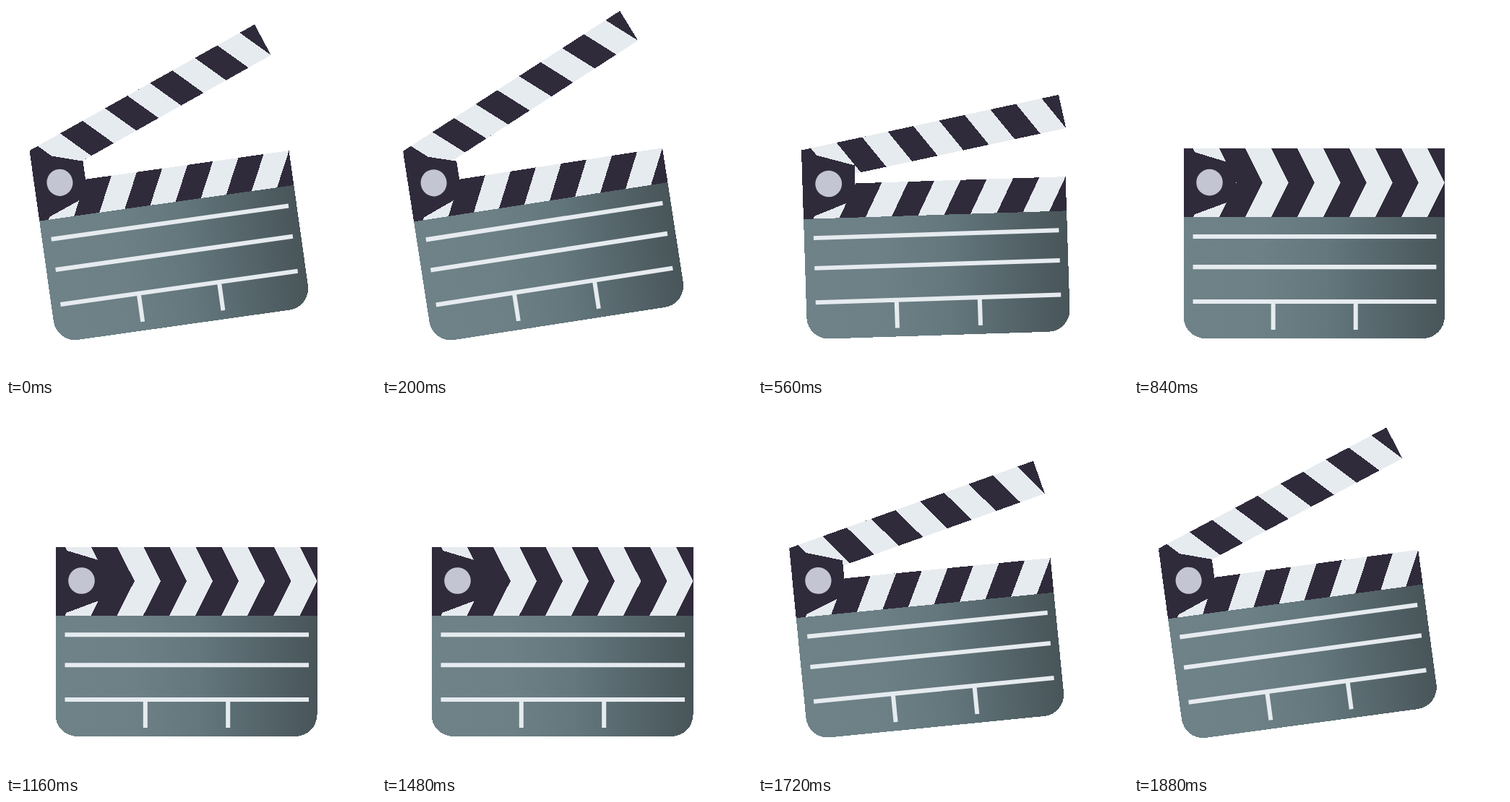
An HTML page that plays this animation: 512x512 px, repeating every 1.92 s.

```html
<!DOCTYPE html>
<html lang="en">
<head>
<meta charset="utf-8">
<title>Clapperboard</title>
<style>
  html, body { margin: 0; width: 100%; height: 100%; overflow: hidden; background: #fff; }
  svg { display: block; width: 100%; height: 100%; }
  .dark { fill: #302b3b; }
  .light { fill: #e6ebef; }
  .crisp { shape-rendering: crispEdges; }
  #board { transform-origin: 113px 458px; }
  #arm { transform-origin: 64px 196.5px; }
</style>
</head>
<body>
<svg viewBox="0 0 512 512">
  <defs>
    <linearGradient id="slate">
      <stop offset="0" stop-color="#6e8288"/>
      <stop offset=".3" stop-color="#6c8086"/>
      <stop offset=".55" stop-color="#63777d"/>
      <stop offset="1" stop-color="#485559"/>
    </linearGradient>
  </defs>
  <g transform="translate(-.5 0)">
    <g id="board">
      <g class="crisp">
        <g id="arm">
          <path class="dark" d="M69 197.5H431V245H69Z"/>
          <path class="light" id="armStripes"/>
        </g>
        <path class="dark" d="M69 245H431V293H69Z"/>
        <path class="light" id="barStripes"/>
        <path class="dark" d="M69 197.5L80 201.4L141.5 220V267.5L85 288.5L76 293H69Z"/>
        <path fill="url(#slate)" d="M69 292.5H431V430A30 30 0 0 1 401 460H99A30 30 0 0 1 69 430Z"/>
      </g>
      <circle cx="105" cy="244.5" r="18.3" fill="#c3c5d3"/>
      <path class="light" d="M82 316.3h337.5v6H82zM82 358.3h337.5v6H82zM82 406h337.5v6H82zM190.3 411h6v37h-6zM304.7 411h6v37h-6z"/>
    </g>
  </g>
</svg>
<script>
const LOOP = 1920, STEP = 40;
const LEAD = 440; // the board is already open when the loop starts
const OPEN = "cubic-bezier(.2, .2, .25, 1)";

const board = document.getElementById("board");
const arm = document.getElementById("arm");

function stripes(id, outer, inner) {
  let d = "";
  for (let i = 0; i < 5; i++) {
    const x = 82.2 + i * 72.2;
    d += `M${x} ${outer}h36.1L${x + 60} ${inner}h-36.1Z`;
  }
  document.getElementById(id).setAttribute("d", d);
}
stripes("armStripes", 197.5, 245);
stripes("barStripes", 292.5, 245);

// Keys are [ms, value, easing to the next key].
function track(el, prop, keys, css) {
  const frames = keys.map(([ms, value, easing = "linear"]) =>
    ({ offset: ms / LOOP, [prop]: css(value), easing }));
  const anim = el.animate(frames, { duration: LOOP, fill: "both" });
  anim.pause();
  return anim;
}

const turn = deg => `${-deg}deg`;
const squash = sx => `${sx} ${1 + .9 * (1 - sx)}`;

const tracks = [
  track(board, "rotate", [
    [0, 0, OPEN], [720, 8.85], [800, 8.85, "cubic-bezier(.42, .07, .7, .88)"],
    [1060, 0], [LOOP, 0]
  ], turn),
  track(arm, "rotate", [
    [0, 0, OPEN], [820, 24], [870, 24, "cubic-bezier(.42, 0, .8, .8)"],
    [1060, 0], [LOOP, 0]
  ], turn),
  track(board, "scale", [
    [0, 1, "cubic-bezier(.3, 0, .6, 1)"], [480, .982], [820, .982, "ease-in-out"],
    [1100, 1.015, "ease-in-out"], [1280, .998, "ease-in-out"], [1500, 1], [LOOP, 1]
  ], squash)
];

function draw(ms) {
  const t = (Math.floor(ms / STEP) * STEP + LEAD) % LOOP;
  for (const anim of tracks) anim.currentTime = t;
}

let start;
function frame(now) {
  start ??= now;
  draw(now - start);
  requestAnimationFrame(frame);
}
draw(0);
requestAnimationFrame(frame);
</script>
</body>
</html>
```
